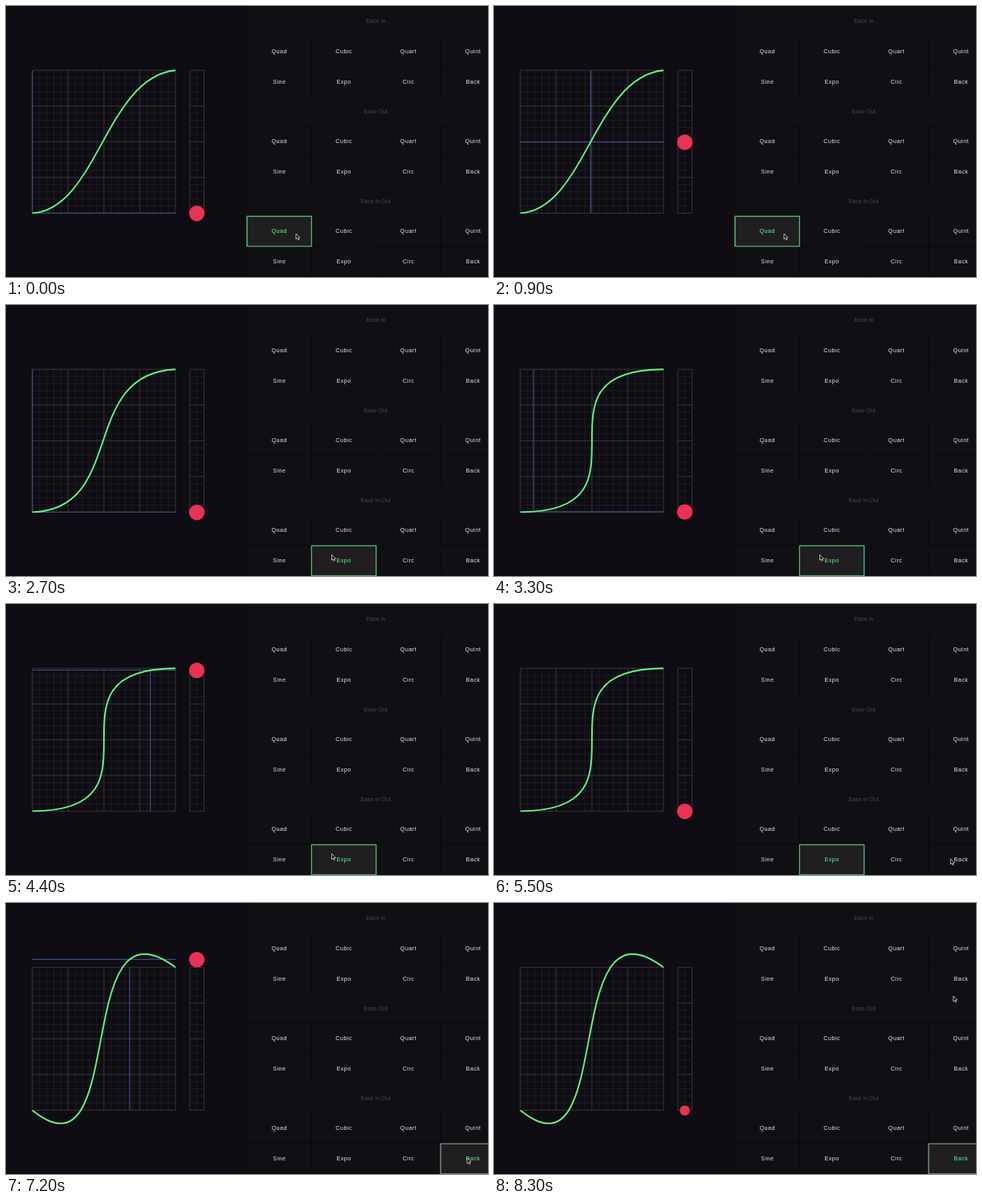
These frames come from a looping animation (600 px wide and 338 px high, 8400 ms). An HTML page with a canvas:

```html
<!DOCTYPE html>
<html lang="en">
<head>
<meta charset="utf-8">
<title>Easing curves</title>
<style>
  html, body { margin: 0; width: 100%; height: 100%; overflow: hidden; background: #0f0d13; }
  canvas { display: block; width: 600px; height: 338px; }
</style>
</head>
<body>
<canvas id="stage"></canvas>
<script>
const LOOP = 8400, PLAY = 1500, CLICK_LEAD = 500, MORPH = 400;
const GREEN = '#60fa86';
const GRID = { x: 32.8, y: 80.2, size: 178.2 };
const TRACK = { x: 228.8, width: 17.8 };
const CELL = { x: 299.6, width: 80.35, height: 38, group: 112.4 };
const GROUPS = ['Ease In', 'Ease Out', 'Ease In Out'];
const EASES = [['Quad', 'Cubic', 'Quart', 'Quint'], ['Sine', 'Expo', 'Circ', 'Back']];

// Each run: start of playback, selected cell in the last group, curve handles
const RUNS = [
  { start: 165, col: 0, row: 0, border: '#55b96d', curve: [.455, .03, .515, .955] },
  { start: 3165, col: 1, row: 1, border: '#55b96d', curve: [1, 0, 0, 1] },
  { start: 6181, col: 3, row: 1, border: '#6f8f78', curve: [.68, -.55, .265, 1.55] },
];
// Pointer stops: [arrive, leave, x, y]
const POINTER = [
  [0, 2050, 361, 284], [2600, 4700, 405.5, 311.5],
  [5600, 7750, 574, 318], [8150, LOOP, 571.8, 116],
];

const canvas = document.getElementById('stage');
const ctx = canvas.getContext('2d');
const dpr = window.devicePixelRatio || 1;
canvas.width = 600 * dpr;
canvas.height = 338 * dpr;

const clamp = v => Math.min(1, Math.max(0, v));
const mix = (a, b, p) => a + (b - a) * p;
const smooth = p => p * p * (3 - 2 * p);
const backOut = p => 1 + 2.7 * (p - 1) ** 3 + 1.7 * (p - 1) ** 2;
const bezier = (a, b, t) => 3 * t * (1 - t) ** 2 * a + 3 * t * t * (1 - t) * b + t ** 3;
const gridX = v => GRID.x + v * GRID.size;
const gridY = v => GRID.y + (1 - v) * GRID.size;

function ease([x1, y1, x2, y2], x) {
  if (x <= 0 || x >= 1) return clamp(x);
  let lo = 0, hi = 1;
  for (let i = 0; i < 30; i++) {
    const mid = (lo + hi) / 2;
    if (bezier(x1, x2, mid) < x) lo = mid; else hi = mid;
  }
  return bezier(y1, y2, lo);
}

function line(x1, y1, x2, y2, color, width = 1) {
  ctx.strokeStyle = color;
  ctx.lineWidth = width;
  ctx.beginPath();
  ctx.moveTo(x1, y1);
  ctx.lineTo(x2, y2);
  ctx.stroke();
}

function label(text, x, y, color, size, spacing) {
  ctx.font = `${size}px "Liberation Sans", Arial, sans-serif`;
  ctx.letterSpacing = spacing + 'px';
  ctx.fillStyle = color;
  ctx.fillText(text, x + spacing / 2, y);
}

function drawGrid() {
  const right = gridX(1), bottom = gridY(0), trackEnd = TRACK.x + TRACK.width;
  for (const major of [false, true]) {
    const color = major ? '#37363b' : '#1d1c21';
    for (let i = 0; i <= 20; i++) {
      if ((i % 5 === 0) !== major) continue;
      const x = gridX(i / 20), y = gridY(i / 20);
      line(x, GRID.y, x, bottom, color);
      line(GRID.x, y, right, y, color);
      line(TRACK.x, y, trackEnd, y, color);
    }
  }
  line(TRACK.x + TRACK.width / 2, GRID.y, TRACK.x + TRACK.width / 2, bottom, '#1d1c21');
  line(TRACK.x, GRID.y, TRACK.x, bottom, '#37363b');
  line(trackEnd, GRID.y, trackEnd, bottom, '#37363b');
}

function drawPanel(run) {
  ctx.textAlign = 'center';
  ctx.textBaseline = 'alphabetic';
  ctx.fillStyle = '#100f14';
  ctx.fillRect(CELL.x, 0, 301, 338);
  GROUPS.forEach((title, g) => {
    const top = g * CELL.group;
    label(title, 460.3, top + 21.2, '#48474b', 7.1, 0);
    EASES.forEach((names, row) => names.forEach((name, col) => {
      const x = CELL.x + col * CELL.width, y = top + 37.2 + row * CELL.height;
      const active = g === 2 && row === run.row && col === run.col;
      if (active) {
        ctx.fillStyle = '#211e22';
        ctx.fillRect(x, y, CELL.width, CELL.height);
      }
      ctx.lineWidth = 1;
      ctx.strokeStyle = active ? run.border : '#0c0b0f';
      if (active || g < 2 || row !== run.row || col !== run.col + 1)
        ctx.strokeRect(x + .4, y + .3, CELL.width, CELL.height - .5);
      label(name, x + CELL.width / 2 + .3, y + 21.3, active ? GREEN : '#e6e6e8', 7.2, .5);
    }));
  });
  // Keep the selected outline above its neighbours' separators
  ctx.strokeStyle = run.border;
  ctx.strokeRect(CELL.x + run.col * CELL.width + .4,
    2 * CELL.group + 37.5 + run.row * CELL.height, CELL.width, CELL.height - .5);
}

function drawCurve([x1, y1, x2, y2]) {
  ctx.strokeStyle = GREEN;
  ctx.lineWidth = 1.9;
  ctx.beginPath();
  ctx.moveTo(gridX(0), gridY(0));
  ctx.bezierCurveTo(gridX(x1), gridY(y1), gridX(x2), gridY(y2), gridX(1), gridY(1));
  ctx.stroke();
}

function drawPointer(time) {
  const i = POINTER.findLastIndex(stop => time >= stop[0]);
  const [, leave, fromX, fromY] = POINTER[i];
  const [arrive, , toX, toY] = POINTER[i + 1] || [LOOP + 1, 0, fromX, fromY];
  const p = smooth(clamp((time - leave) / (arrive - leave)));
  ctx.save();
  ctx.translate(mix(fromX, toX, p), mix(fromY, toY, p));
  ctx.beginPath();
  [[0, 0], [0, 6.8], [1.6, 5.4], [2.7, 7.8], [3.8, 7.3], [2.8, 5], [4.9, 5]]
    .forEach(([x, y]) => ctx.lineTo(x, y));
  ctx.closePath();
  ctx.fillStyle = '#08080a';
  ctx.fill();
  ctx.strokeStyle = '#d8d8da';
  ctx.lineWidth = .8;
  ctx.stroke();
  ctx.restore();
}

function draw(time) {
  const index = RUNS.findLastIndex(run => time >= run.start - CLICK_LEAD);
  const run = RUNS[index], previous = RUNS[index - 1] || run;
  const morph = backOut(clamp((time - run.start + CLICK_LEAD) / MORPH));
  const progress = clamp((time - run.start) / PLAY);
  const value = ease(run.curve, progress);

  // After a short hold the ball shrinks at the end and grows again at the start
  const rest = time - run.start - PLAY;
  const reset = rest >= 500;
  const scale = reset ? clamp((rest - 500) / 185) : 1 - clamp((rest - 370) / 130);

  ctx.setTransform(dpr, 0, 0, dpr, 0, 0);
  ctx.fillStyle = '#0f0d13';
  ctx.fillRect(0, 0, 600, 338);
  drawPanel(run);
  drawGrid();

  if (!reset) {
    const x = gridX(progress), y = gridY(value);
    ctx.globalAlpha = scale;
    line(x, GRID.y, x, gridY(0), '#3c4c7c', 1.2);
    line(GRID.x, y, gridX(1), y, '#3c4c7c', 1.2);
    ctx.globalAlpha = 1;
  }
  drawCurve(run.curve.map((v, i) => mix(previous.curve[i], v, morph)));

  ctx.fillStyle = '#ea3252';
  ctx.beginPath();
  ctx.arc(237.5, gridY(reset ? 0 : value) + .3, 9.7 * scale, 0, 2 * Math.PI);
  ctx.fill();
  drawPointer(time);
}

const begin = performance.now();
function frame() {
  draw((performance.now() - begin) % LOOP);
  requestAnimationFrame(frame);
}
frame();
</script>
</body>
</html>
```
